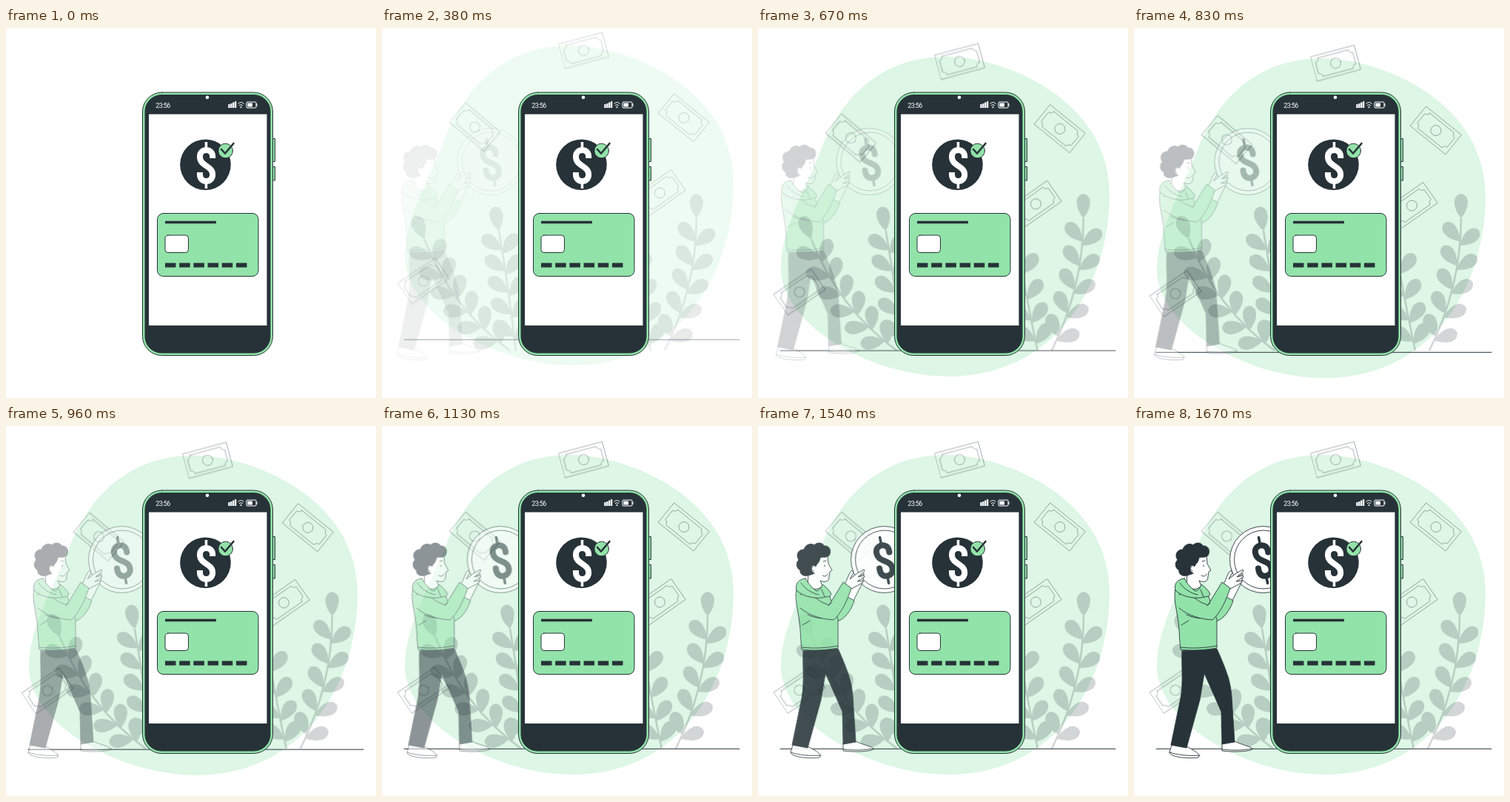
Write an HTML page that moves like this. It is 500 px wide and 500 px high and loops after 1710 ms.

```html
<!DOCTYPE html>
<html lang="en">
<head>
<meta charset="utf-8">
<title>Mobile payment</title>
<style>
  html, body { margin: 0; width: 100%; height: 100%; overflow: hidden; background: #fff; }
  svg { display: block; width: 100%; height: 100%; }
  .ink { fill: #263238; }
  .mint { fill: #92e3a9; }
  .white { fill: #fff; }
  .line { fill: none; }
  .out, .line { stroke: #263238; stroke-linecap: round; stroke-linejoin: round; }
  .time { font: 9px Roboto, sans-serif; letter-spacing: -.6px; }
</style>
</head>
<body>
<svg viewBox="0 0 500 500">
  <defs>
    <g id="note" class="line" stroke-width=".9">
      <rect x="-30.5" y="-17" width="61" height="34"/>
      <path d="M-21 -13H21A5 5 0 0 0 26 -8V8A5 5 0 0 0 21 13H-21A5 5 0 0 0 -26 8V-8A5 5 0 0 0 -21 -13Z"/>
      <circle r="7"/>
    </g>
    <g id="dollar" fill="none" stroke="currentColor">
      <path stroke-width="8" d="M8.700 -9V-11C8.700 -23 -8.500 -23 -8.500 -11C-8.500 2 8.700 1 8.700 13C8.700 25 -8.500 25 -8.500 13V10"/>
      <path stroke-width="3.500" d="M0 -31V-20M0 21V32"/>
    </g>
  </defs>

  <g id="backdrop">
    <path fill="#ddf6e5" d="M31 325C31 270 66 215 85 165C112 95 165 39 255 39C330 39 475 95 475 225C475 350 400 471 258 471C150 471 31 400 31 325Z"/>
  </g>
  <g id="plants"></g>
  <g id="scene">
    <g id="notes" opacity=".42"></g>
    <path class="line" d="M30 436.300H483"/>
  </g>

  <g id="payer" class="out" stroke-width=".9">
    <g class="white">
      <circle cx="174.500" cy="180.500" r="45"/>
      <circle cx="175" cy="180.500" r="39.500"/>
    </g>
    <use href="#dollar" color="#263238" transform="translate(174.500 181) rotate(-11)"/>

    <!-- legs and shoes -->
    <path class="white" d="M51 431L48 441C49 447 70 450 87 448C91 444 83 439 71 433ZM119 428V439C134 441 155 440 160 437C160 433 145 431 136 426Z"/>
    <path class="line" d="M48 441C60 445 74 446 89 445M119 437C135 439 149 438 160 436"/>
    <path class="ink" d="M65 304L112 301C125 330 131 347 132 366L136 427L119 430L118 386L95 334L89 370L71 435L50 431L63 368C67 345 64 325 65 304Z"/>

    <!-- far arm, torso, near arm -->
    <path class="white" d="M122 232L137 207L147 199L146 210L133 236Z"/>
    <path class="mint" d="M102 258L123 230L134 236C130 248 122 261 111 264Z"/>
    <path class="mint" d="M57 217C53 229 56 240 58 253C62 272 61 287 63 302C78 304 96 303 112 300V261L101 231C98 222 94 216 88 213Z"/>
    <path class="line" d="M63 299C80 301 96 300 112 297"/>
    <path class="white" d="M121 214C125 207 126 199 131 195L133 198L128 207L138 199L147 194L148 196L139 204L147 202L148 204L138 210L146 209L145 212L132 219L126 222Z"/>
    <path class="mint" d="M61 228C70 223 81 232 90 238L100 242L119 211L130 219C125 235 116 254 106 262C91 261 74 257 61 246"/>
    <path class="line" d="M64 269L74 263M71 255C77 258 83 259 89 260M99 243L103 239"/>

    <!-- head and hood -->
    <path class="white" d="M72 198L71 215C79 223 86 221 91 216L88 209C95 212 100 210 100 204L101 197L104 195L99 186L98 174L82 174L72 190Z"/>
    <path class="ink" d="M72 202C64 204 60 199 61 195C55 192 55 184 59 181C54 174 59 166 66 167C68 159 77 158 80 161C84 156 92 158 93 162C100 161 104 168 100 175C95 179 90 176 88 178C87 185 83 186 82 190C79 187 75 189 76 194C76 197 79 198 80 199Z"/>
    <path class="line" d="M92 183L96 182M94 188V190M91 202C94 204 97 203 98 200M78 190C75 192 77 196 79 196"/>
    <path class="mint" d="M68 206C57 207 54 215 56 222C66 232 83 233 91 232C96 230 101 232 103 227C100 221 95 217 91 214C89 220 86 223 83 223C78 220 72 213 68 206Z"/>
    <path class="line" d="M62 212C68 221 77 226 86 228M90 221L94 231"/>
  </g>

  <g class="out">
    <path class="mint" d="M358 149.500H363.500V180.500H358ZM358 187.500H363.500V206H358Z"/>
    <rect class="mint" x="184.500" y="87" width="176" height="355.500" rx="26"/>
    <rect class="ink" x="188" y="90.500" width="169" height="348.500" rx="22"/>
  </g>
  <path class="white" d="M193 116.500H352.500V402H193Z"/>
  <g class="white">
    <circle cx="272" cy="93.800" r="2.300"/>
    <text class="time" x="202.300" y="108">23:56</text>
    <path d="M300.300 103H302.600V108H300.300ZM303.200 102H305.500V108H303.200ZM306.100 100.500H308.400V108H306.100ZM309 99H311.300V108H309ZM326.500 101.500H333V106.500H326.500ZM338.300 102.300H339.500V105.700H338.300Z"/>
    <circle cx="317.500" cy="107" r="1.100"/>
  </g>
  <g fill="none" stroke="#fff">
    <path d="M313.500 102.500Q317.500 98.500 321.500 102.500M315 104.800Q317.500 102.500 320 104.800"/>
    <rect x="325" y="100" width="13" height="8" rx="1"/>
  </g>

  <circle class="ink" cx="269.500" cy="184.700" r="34.300"/>
  <use href="#dollar" color="#fff" transform="translate(270.500 185)"/>
  <circle class="mint out" cx="296.700" cy="166" r="9.800"/>
  <path class="line" stroke-width="2.600" d="M291 164L296 169.500L307.500 156"/>

  <g class="out">
    <rect class="mint" x="204.500" y="250.500" width="136.500" height="85" rx="8"/>
    <rect class="white" x="215" y="280" width="31.500" height="23.500" rx="4"/>
  </g>
  <path class="ink" d="M215 260.700H284V264.300H215Z"/>
  <path fill="none" stroke="#263238" stroke-width="6" stroke-dasharray="14.500 4.700" d="M215 320.500H325.500"/>
</svg>
<script>
const LOOP = 1710, FIRST_STEP = 170, DISTANCE = 30;
const byId = id => document.getElementById(id);

// [x, y, angle]
const notes = [[272.5, 45.5, -15], [408, 136.5, 39], [125.5, 149, 40], [375.5, 238, -35], [56, 357, -34]];
byId('notes').innerHTML = notes.map(([x, y, a]) =>
  `<use href="#note" transform="translate(${x} ${y}) rotate(${a})"/>`).join('');

const leaf = (x, y, angle) =>
  `<path transform="translate(${x} ${y}) rotate(${angle})" d="M0 0C10 -12 14 -30 0 -33C-14 -30 -10 -12 0 0Z"/>`;

// A quadratic stem with evenly spaced leaf pairs and one leaf at the tip.
function plant([x0, y0], [x1, y1], [x2, y2], pairs) {
  const mix = (a, b, c, t) => (1 - t) ** 2 * a + 2 * t * (1 - t) * b + t * t * c;
  const slope = (a, b, c, t) => (1 - t) * (b - a) + t * (c - b);
  const leafAt = (t, turn) => {
    const angle = Math.atan2(slope(x0, x1, x2, t), -slope(y0, y1, y2, t)) * 180 / Math.PI;
    return leaf(mix(x0, x1, x2, t), mix(y0, y1, y2, t), angle + turn);
  };
  let out = `<path fill="none" stroke="#263238" stroke-width="2.5" d="M${x0} ${y0}Q${x1} ${y1} ${x2} ${y2}"/>`;
  for (let i = 0; i < pairs; i++) {
    const t = .08 + .9 * i / pairs;
    out += leafAt(t, 46) + leafAt(t + .03, -46);
  }
  return out + leafAt(1, 0);
}
byId('plants').innerHTML = '<g class="ink" opacity=".2">' +
  plant([397, 436], [440, 350], [440, 257], 5) +
  plant([378, 436], [366, 380], [350, 290], 4) +
  plant([188, 436], [110, 380], [72, 285], 6) +
  plant([196, 436], [186, 350], [173, 274], 5) + '</g>';

function bezier(x1, y1, x2, y2) {
  const at = (a, b, s) => 3 * (1 - s) ** 2 * s * a + 3 * (1 - s) * s * s * b + s ** 3;
  return x => {
    if (x >= 1) return 1;
    let lo = 0, hi = 1;
    for (let i = 0; i < 24; i++) {
      const mid = (lo + hi) / 2;
      if (at(x1, x2, mid) < x) lo = mid; else hi = mid;
    }
    return at(y1, y2, lo);
  };
}
const overshoot = bezier(.36, -.01, .5, 1.38);
const easeIn = bezier(.42, 0, 1, 1);

function slide(id, progress, dx, dy) {
  const rest = (progress - 1) * DISTANCE;
  byId(id).setAttribute('transform', `translate(${rest * dx} ${rest * dy})`);
  byId(id).setAttribute('opacity', Math.max(0, Math.min(1, progress)));
}

function draw(time) {
  const t = time % LOOP;
  const shown = t >= FIRST_STEP;
  const settle = shown ? overshoot(t / 1000) : 0;
  slide('backdrop', settle, 0, 1);
  slide('scene', settle, 0, 1);
  slide('plants', settle, 1, 0);
  slide('payer', shown ? easeIn(t / 1675) : 0, 1, 0);
}

const start = performance.now();
function tick() {
  draw(performance.now() - start);
  requestAnimationFrame(tick);
}
tick();
</script>
</body>
</html>
```
